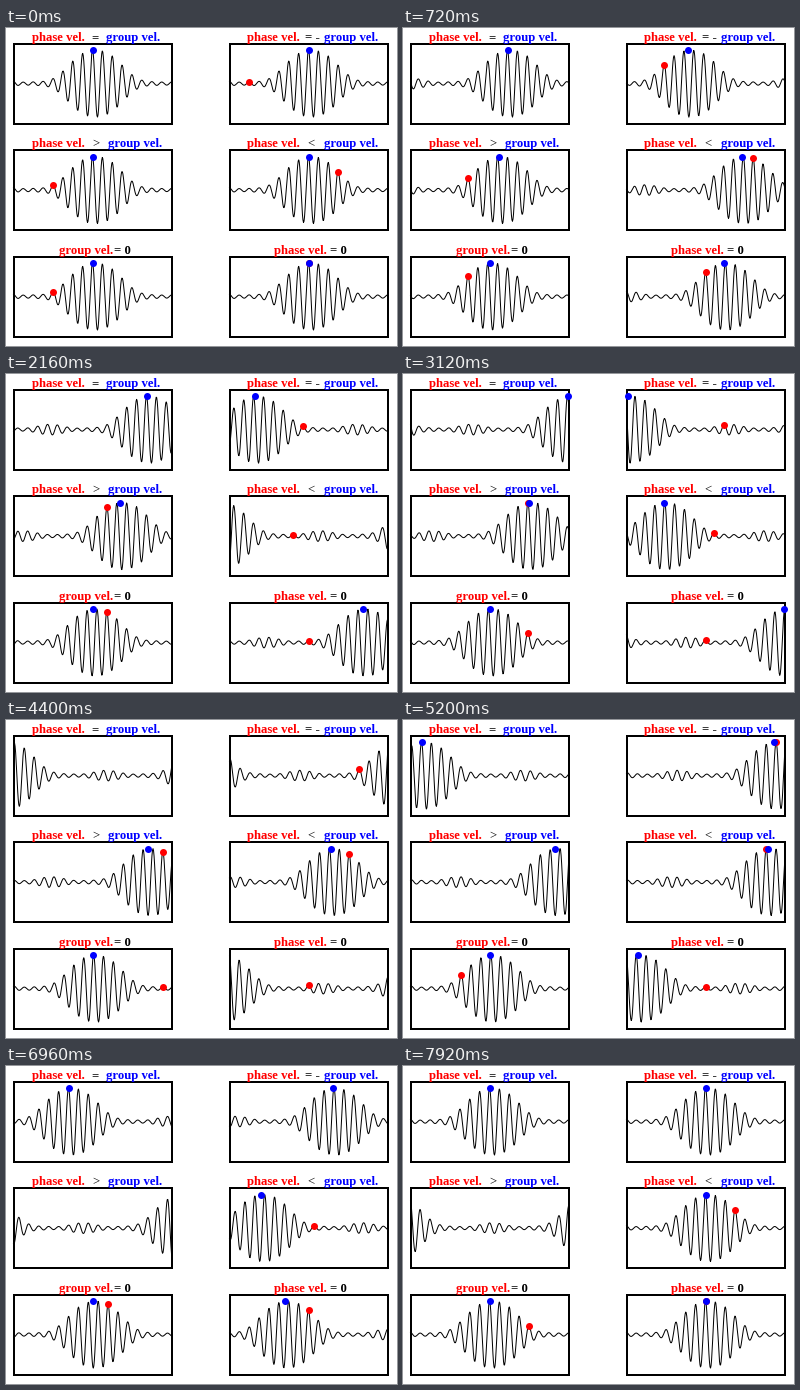
These frames come from a looping animation (391 by 318 pixels, 8 s). A matplotlib script:

```python
import numpy as np
import matplotlib.pyplot as plt
from matplotlib.animation import FuncAnimation
from matplotlib.patches import Rectangle

W, H = 391, 318
PT = 0.72                 # points per pixel at 100 dpi
FRAMES, STEP_MS = 100, 80
PERIOD = 198              # pixels per repeat of the wave train
WAVES = 20                # carrier cycles per period
AMP = 33.6
HALF_W, HALF_H = 79, 40
EDGE = 0.4                # visible half range, in periods
COLS = (86.5, 302.5)
ROWS = (55.6, 162.1, 268.6)

fig = plt.figure(figsize=(W / 100, H / 100), dpi=100, facecolor="white")
ax = fig.add_axes([0, 0, 1, 1])
ax.set_xlim(0, W)
ax.set_ylim(H, 0)
ax.axis("off")


def envelope(u):
    a = 2 * np.pi * (u - 0.015)
    return (0.33 + 0.41 * np.cos(a) + 0.25 * np.cos(2 * a)
            + 0.035 * np.cos(3 * a) - 0.025 * np.cos(5 * a))


def label(x, y, text, color="black", weight="bold", ha="left"):
    ax.text(x, y, text, color=color, weight=weight, ha=ha, va="baseline",
            family="Liberation Serif", size=12.7 * PT)


class Panel:
    """A wave packet with a red phase marker and a blue group marker."""

    def __init__(self, col, row, phase, group, red=None, wrap=0, right=EDGE):
        self.cx, self.cy = COLS[col], ROWS[row]
        self.phase, self.group = phase, group
        self.red, self.wrap, self.right = red, wrap, right
        self.u = np.linspace(-1, 1, 300) * HALF_W / PERIOD
        ax.add_patch(Rectangle((self.cx + 0.5 - HALF_W, self.cy - HALF_H),
                               2 * HALF_W, 2 * HALF_H, fill=False,
                               ec="black", lw=2 * PT))
        self.line, = ax.plot([], [], color="black", lw=PT)
        self.red_dot = self.dot("red", 3)
        self.blue_dot = self.dot("blue", 4)

    def dot(self, color, z):
        return ax.plot([], [], "o", color=color, ms=7 * PT, mew=0, zorder=z)[0]

    def place(self, dot, u, height):
        dot.set_data([self.cx + u * PERIOD], [self.cy - AMP * height])

    def draw(self, t):
        carrier = np.cos(2 * np.pi * WAVES * (self.u - self.phase * t))
        wave = envelope(self.u - self.group * t) * carrier
        self.line.set_data(self.cx + self.u * PERIOD, self.cy - AMP * wave)

        u = (self.group * t + 0.5) % 1 - 0.5
        self.place(self.blue_dot, u, 1)
        self.blue_dot.set_visible(-EDGE <= u <= self.right)

        if self.red is None:
            return
        u = self.red + self.phase * t
        while self.wrap and u > EDGE:
            u -= self.wrap
        self.place(self.red_dot, u, envelope(u - self.group * t))
        self.red_dot.set_visible(u <= EDGE)


panels = [
    Panel(0, 0, 1, 1),
    Panel(1, 0, 1, -1, red=-0.3, right=0.405),
    Panel(0, 1, 1, 0.5, red=-0.2),
    Panel(1, 1, 1, 2, red=0.15, wrap=0.5, right=0.405),
    Panel(0, 2, 1, 0, red=-0.2, wrap=0.6),
    Panel(1, 2, 0, 1, red=0),
]

PHASE, GROUP = "phase vel.", "group vel."
for x, y, sign, sign_x, group_x in [
    (26, 13.3, "=", 89, 100.5),
    (241.2, 13.3, "= -", 306, 317.5),
    (26, 119.5, ">", 89.5, 101.7),
    (241.2, 119.5, "<", 305, 317.5),
]:
    label(x, y, PHASE, "red")
    label(sign_x, y, sign, weight="normal" if sign in "<>" else "bold", ha="center")
    label(group_x, y, GROUP, "blue")

for x, text, zero_x in [(53.2, GROUP, 108.5), (268.2, PHASE, 323.5)]:
    label(x, 225.8, text, "red")
    label(zero_x, 225.8, "= 0")


def update(i):
    t = i / (FRAMES - 1)
    for panel in panels:
        panel.draw(t)
    return []


anim = FuncAnimation(fig, update, frames=FRAMES, interval=STEP_MS,
                     repeat=True, repeat_delay=0, blit=False)
plt.show()
```
